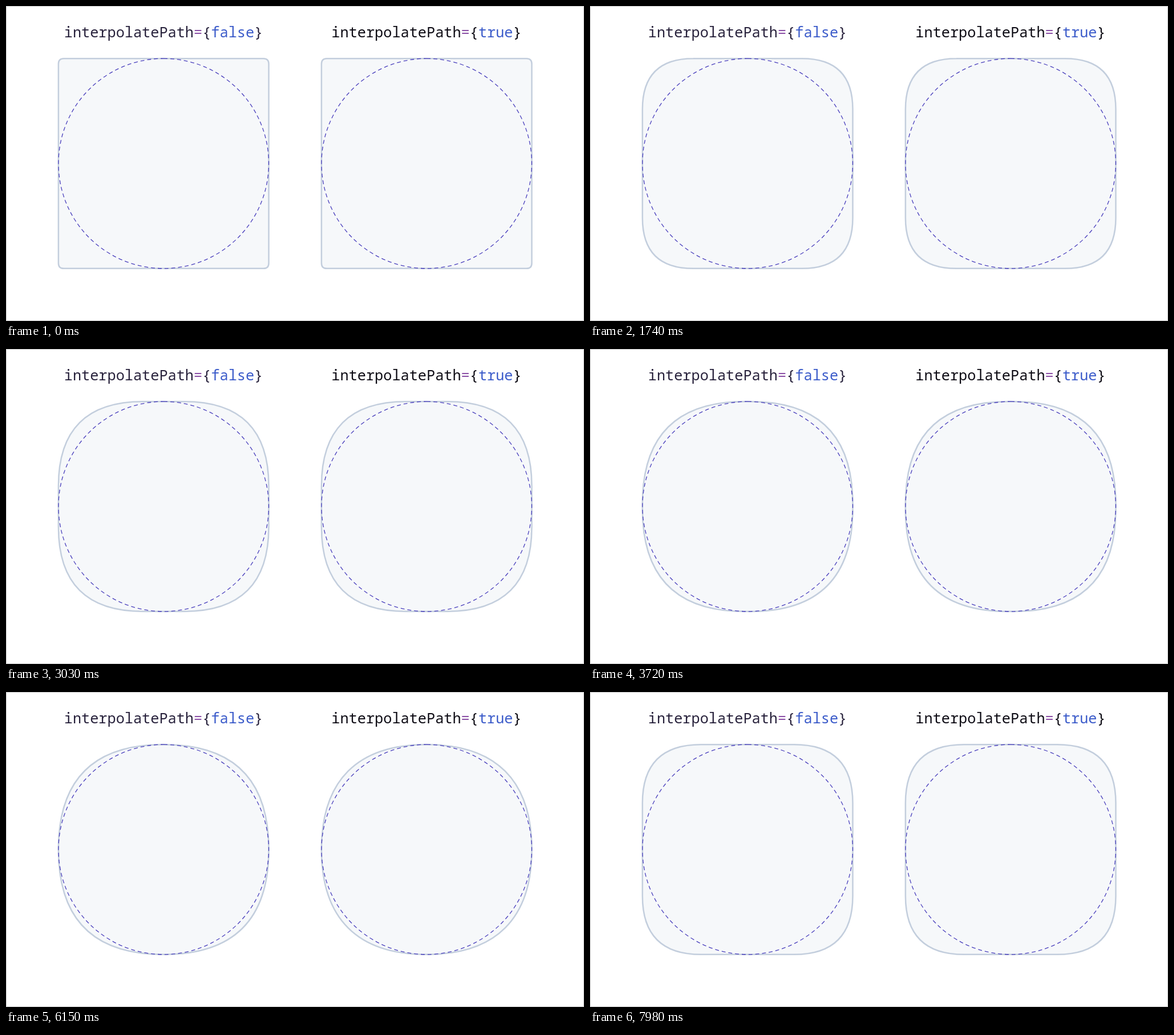
An HTML page for the animation above (8 s loop, 1013x553 px).

```html
<!DOCTYPE html>
<html lang="en">
<head>
<meta charset="utf-8">
<title>Corner interpolation</title>
<style>
  html, body { margin: 0; width: 100%; height: 100%; overflow: hidden; background: #fff; }
  svg { display: block; width: 1013px; height: 553px; }
  text { font: 400 25.25px "Noto Sans Mono", "DejaVu Sans Mono", monospace; text-anchor: middle; }
  .frame { fill: none; stroke: #c4c4c4; }
  .shape { fill: #f6f8fa; stroke: #c3cedd; stroke-width: 2.5; }
  .guide { fill: none; stroke: #4a40bd; stroke-width: 1.3; stroke-dasharray: 6.9 4.98; }
  .op { fill: #8b50a6; }
  .value { fill: #3c5cca; }
</style>
</head>
<body>
<svg viewBox="0 0 1013 553">
  <rect class="frame" x=".5" y=".5" width="1012" height="552"/>
  <text x="276" y="55" fill="#28223c">interpolatePath<tspan class="op">=</tspan>{<tspan class="value">false</tspan>}</text>
  <text x="737" y="55" fill="#0d0b14">interpolatePath<tspan class="op">=</tspan>{<tspan class="value">true</tspan>}</text>
  <g transform="translate(276.2 276.5)">
    <path class="shape" id="clamped"/>
    <circle class="guide" r="184.3" transform="rotate(-90)"/>
  </g>
  <g transform="translate(737.2 276.5)">
    <path class="shape" id="smooth"/>
    <circle class="guide" r="184.3" transform="rotate(-90)"/>
  </g>
</svg>
<script>
  const LOOP = 8000, STEP = 30;
  const GROW_END = 4500, SHRINK_START = 5550;
  const HALF = 184.3, MIN_RADIUS = 8;
  const RATE = (HALF - MIN_RADIUS) / (GROW_END / STEP);

  const SQUIRCLE = 2 / 3;   // handle length of the smoothed corner
  const CIRCLE = 0.5523;    // handle length of a circular arc
  const EXTENT = 1.17;      // edge length used per unit of radius
  const LIMIT = HALF / EXTENT;

  const clamped = document.getElementById('clamped');
  const smooth = document.getElementById('smooth');

  function radiusAt(time) {
    const tick = Math.floor(time / STEP);
    if (time < SHRINK_START) return Math.min(HALF, MIN_RADIUS + RATE * tick);
    return HALF - RATE * (tick - SHRINK_START / STEP + 1);
  }

  // Rounded square around the origin, one cubic per corner.
  function squarePath(extent, handle) {
    const near = HALF - extent;
    const ctrl = HALF - extent * (1 - handle);
    let d = `M${-near} ${-HALF}`;
    let ux = 1, uy = 0;
    for (let i = 0; i < 4; i++) {
      const at = (along, across) =>
        `${(along * ux - across * uy).toFixed(2)} ${(along * uy + across * ux).toFixed(2)}`;
      d += `L${at(near, -HALF)}C${at(ctrl, -HALF)} ${at(HALF, -ctrl)} ${at(HALF, -near)}`;
      [ux, uy] = [-uy, ux];
    }
    return d + 'Z';
  }

  function draw(time) {
    const radius = radiusAt(time);
    const extent = Math.min(HALF, radius * EXTENT);
    const blend = Math.max(0, (radius - LIMIT) / (HALF - LIMIT));
    clamped.setAttribute('d', squarePath(extent, SQUIRCLE));
    smooth.setAttribute('d', squarePath(extent, SQUIRCLE + (CIRCLE - SQUIRCLE) * blend));
  }

  const start = performance.now();
  function tick() {
    draw((performance.now() - start) % LOOP);
    requestAnimationFrame(tick);
  }
  tick();
</script>
</body>
</html>
```
